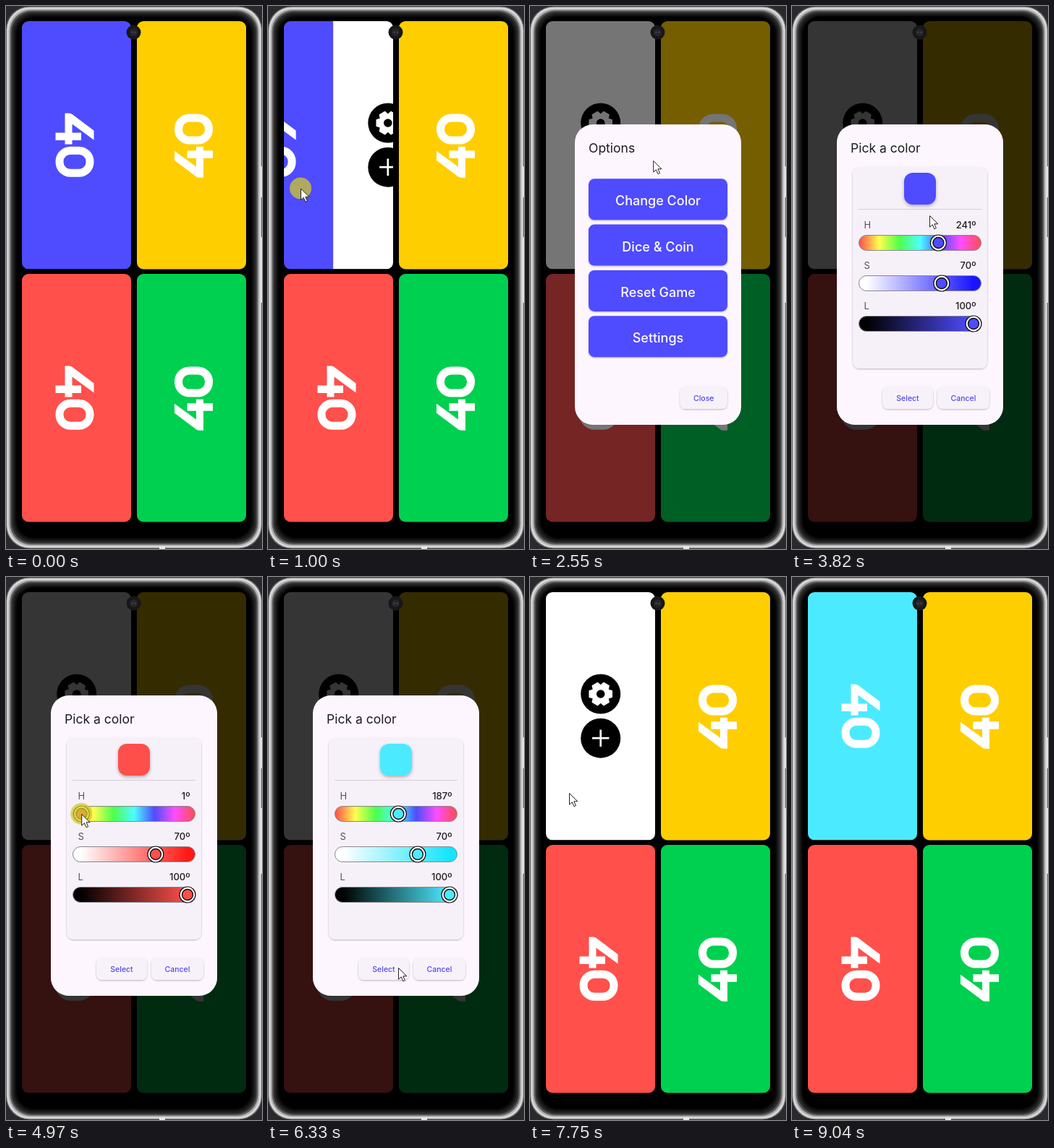
Animation, 354 px wide and 752 px high, one loop 9.9 s. Source, as an HTML page:

```html
<!DOCTYPE html>
<html lang="en">
<head>
<meta charset="utf-8">
<title>Score counter</title>
<style>
  html, body { margin: 0; width: 100%; height: 100%; overflow: hidden; background: #29292e; }
  svg { display: block; width: 354px; height: 752px; }
  text { font-family: Inter, Roboto, sans-serif; }
  .title { font-size: 17.5px; fill: #1d1b20; }
  .big { font-size: 18px; font-weight: 500; fill: #fff; text-anchor: middle; }
  .small { font-size: 10.5px; font-weight: 500; fill: #5048f0; text-anchor: middle; }
  .label { font-size: 13px; fill: #55525a; }
  .value { font-size: 13px; font-weight: 500; fill: #1d1b20; text-anchor: end; }
</style>
</head>
<body>
<svg id="stage" viewBox="0 0 354 752" xmlns="http://www.w3.org/2000/svg"></svg>
<script>
const LOOP = 9900;
const CELL = { w: 151, h: 343.4, r: 9 };
const stage = document.getElementById('stage');

const rect = (x, y, w, h, r, fill, more = '') =>
  `<rect x="${x}" y="${y}" width="${w}" height="${h}" rx="${r}" fill="${fill}" ${more}/>`;
const text = (cls, x, y, str, more = '') =>
  `<text class="${cls}" x="${x}" y="${y}" ${more}>${str}</text>`;
const group = (x, y, turn, inner) =>
  `<g transform="translate(${x} ${y}) rotate(${turn})">${inner}</g>`;
const each = (n, f) => Array.from({ length: n }, (_, i) => f(i)).join('');
const vivid = (h, s = 70) => `hsl(${h} 100% ${100 - s / 2}%)`;

// ---------- phone ----------
const ring = (d, grey) =>
  rect(d, d + 0.5, 354 - 2 * d, 751 - 2 * d, 32 - d / 2, `rgb(${grey},${grey},${grey})`);

function phone() {
  const metal = ring(0, 110) + ring(1.2, 218) + ring(3.5, 176) + ring(5.5, 92);
  const bezel = each(9, i => ring(7.5 + i, 52 * (1 - i / 8) ** 1.3));
  const keys = rect(352, 222, 2, 43, 0, '#e4e4e4') + rect(352, 320, 2, 91, 0, '#e4e4e4');
  return metal + bezel + keys + rect(212, 748, 8, 4, 0, '#e8e8e8');
}

function camera() {
  const lens = [-1, 1].map(s => `<circle cx="${2 * s}" r="1.2" fill="#45454f"/>`).join('');
  return group(176.5, 36.5, 0, `<circle r="10" fill="#17171a"/><circle r="5.5" fill="#242429"/>${lens}`);
}

// ---------- score panels ----------
const forty = (x, y, turn) => group(x, y, turn, `
  <rect x="7.7" y="-21" width="31" height="42" rx="15" fill="none" stroke="#fff" stroke-width="11"/>
  <path fill="#fff" d="M-20 -26.5L-43 4Q-44 6 -44 8V13.5H-1V3.5H-29L-7 -26.5Z"/>
  <path fill="#fff" d="M-17 -9H-6.5V26.5H-17Z"/>`);

const gear = (x, y) => group(x, y, 0, `<circle r="27.5"/><g fill="#fff">
  ${each(6, i => `<path d="M8 -6.5L15.5 -4.2V4.2L8 6.5Z" stroke="#fff" stroke-width="1.6"
    stroke-linejoin="round" transform="rotate(${i * 60})"/>`)}<circle r="12.2"/></g><circle r="5.8"/>`);

const plus = (x, y) => group(x, y, 0,
  '<circle r="27.5"/><path d="M-11.7 0H11.7M0 -11.7V11.7" stroke="#fff" stroke-width="2.7"/>');

function panels() {
  const cells = ['#504bff', '#ffce00', '#ff504c', '#00d050'].map((color, i) => {
    const col = i % 2, row = i >> 1;
    const x = 22 + col * 159, y = 21 + row * 350;
    const number = forty(95 + col * 164.5, 192.5 + row * 350 + col * 1.2, col ? -90 : 90);
    const card = r => rect(x, y, CELL.w, CELL.h, r, color, i ? '' : 'id="card"');
    return i ? card(CELL.r) + number : `<g clip-path="url(#cell)">
      <g id="score">${card(0)}${number}</g>
      <g id="menu">${rect(x, y, CELL.w + 1, CELL.h, 0, '#fff')}${gear(97.7, 162)}${plus(97.7, 223.2)}</g></g>`;
  });
  return `<clipPath id="cell">${rect(22, 21, CELL.w, CELL.h, CELL.r, '#000')}</clipPath>` + cells.join('');
}

// ---------- dialogs ----------
const dialog = (id, title, inner) => `<g id="${id}">
  ${rect(16, 14, 322, 714, 24, '#000', 'opacity=".54"')}
  ${rect(62, 164, 230, 416, 25, '#fdf6ff')}
  ${text('title', 81, 203, title)}${inner}</g>`;

const flat = (x, w, str) => rect(x, 527, w, 31, 8, '#f7f2fa', 'filter="url(#lift)"') +
  text('small', x + w / 2, 547, str);

function options() {
  const rows = ['Change Color', 'Dice &amp; Coin', 'Reset Game', 'Settings'].map((s, i) => {
    const y = 239.3 + i * 63.3;
    return rect(81, y, 192, 57, 8, '#504bff', 'filter="url(#lift)"') + text('big', 177, y + 37, s);
  });
  return dialog('options', 'Options', rows.join('') + flat(207.5, 65.5, 'Close'));
}

const slider = (name, i) => {
  const y = 328 + i * 56;
  return text('label', 99.5, y - 20, name) + text('value', 254.5, y - 20, '', `id="v${name}"`) +
    rect(92.5, y - 10.5, 169, 21, 10.5, `url(#g${name})`, 'stroke="#8a878f"') +
    `<g id="t${name}"><circle cy="${y}" r="11" fill="#fff" stroke="#111" stroke-width="1.2"/>
     <circle class="dot" cy="${y}" r="7.5" stroke="#111" stroke-width="1.4"/></g>`;
};

function picker() {
  const rainbow = each(13, i => `<stop offset="${i / 12}" stop-color="${vivid(i * 30)}"/>`);
  const fade = (name, from) => `<linearGradient id="g${name}">
    <stop stop-color="${from}" offset=".06"/><stop id="e${name}" offset=".94"/></linearGradient>`;
  return `<linearGradient id="gH">${rainbow}</linearGradient>${fade('S', '#fff')}${fade('L', '#000')}` +
    dialog('picker', 'Pick a color',
      rect(84, 222.5, 186, 279.5, 9, '#f6f1f8', 'filter="url(#lift)"') +
      rect(155, 231, 44, 44, 12, '#fff', 'id="swatch" filter="url(#drop)"') +
      rect(92, 281, 170, 1, 0, '#d3ced6') + ['H', 'S', 'L'].map(slider).join('') +
      flat(125, 70, 'Select') + flat(201, 72, 'Cancel'));
}

const shadow = (id, dy, blur, a) => `<filter id="${id}" x="-20%" y="-20%" width="140%" height="150%">
  <feDropShadow dx="0" dy="${dy}" stdDeviation="${blur}" flood-opacity="${a}"/></filter>`;

stage.innerHTML = `<defs>${shadow('lift', 1, 0.8, 0.28)}${shadow('drop', 2, 2, 0.3)}</defs>
  ${phone()}${panels()}${options()}${picker()}${camera()}
  <g id="cursor"><circle id="press" r="15" fill="#d2ca28" opacity=".74"/>
  <path d="M.5 .5V16.2L4.2 12.8L6.9 18.8L9.4 17.7L6.8 11.8H11.8Z" fill="#fff" stroke="#222"/></g>`;

const el = {};
stage.querySelectorAll('[id]').forEach(n => el[n.id] = n);
const dots = stage.querySelectorAll('.dot');

// ---------- motion ----------
const ramp = (t, from, to) => Math.min(1, Math.max(0, (t - from) / (to - from)));
const ease = k => k * k * (3 - 2 * k);
const within = (t, from, to) => t >= from && t < to;

const OPEN = 780, BACK = 8040, DRAG = 280;
const HUE_FROM = 4440, HUE_TO = 5180;
const TAPS = [1800, 3150, 5920, 7070];

// the finger pulls the page part of the way, then it settles
const swipe = t => 0.62 * ease(ramp(t, 0, DRAG)) +
  0.38 * (1 - (1 - ramp(t, DRAG, DRAG + 410)) ** 2);

// one sweep over the whole hue bar and back to cyan
const hue = t => 180 + 180 * Math.cos(-1.225 + 5.976 * ramp(t, HUE_FROM, HUE_TO));
const knob = v => 104 + v * 147;

const fade = (t, show, hide) => ramp(t, show, show + 200) * (1 - ramp(t, hide, hide + 150));

// pointer legs: start, end, x, y
const ENTRY = [318, 698];
const LEGS = [
  [120, 650, 130, 256], [OPEN, OPEN + DRAG, 34, 252],
  [1680, 1800, 88, 152], [2150, 2600, 173, 216], [2690, 2890, 175, 283],
  [3480, 3820, 190, 290], [3820, 4230, 202, 328],
  [HUE_FROM, HUE_TO, 180, 328], [5230, 5380, 203, 499],
  [5450, 5780, 169, 545], [6140, 6330, 180, 541], [6670, 6930, 230, 535],
  [7230, 7750, 54, 299], [7890, 8010, 34, 275], [BACK, BACK + DRAG, 130, 270],
  [8380, 8830, 257, 524], [8900, 8970, 283, 669]
];

function pointer(t) {
  if (within(t, HUE_FROM, HUE_TO)) return [knob(hue(t) / 360), 328];
  return LEGS.reduce(([px, py], [from, to, x, y]) => {
    const k = ease(ramp(t, from, to));
    return [px + (x - px) * k, py + (y - py) * k];
  }, ENTRY);
}

const pressed = t => TAPS.some(a => within(t, a, a + 130)) ||
  [OPEN, BACK].some(a => within(t, a, a + DRAG + 40)) || within(t, HUE_FROM, HUE_TO);

const move = (n, x, y = 0) => n.setAttribute('transform', `translate(${x} ${y})`);
const fill = (n, c) => n.setAttribute('fill', c);
const show = (n, a) => {
  n.setAttribute('opacity', a);
  n.style.display = a > 0 ? '' : 'none';
};

function draw(t) {
  const p = swipe(t - OPEN) - swipe(t - BACK);
  move(el.score, -CELL.w * p);
  move(el.menu, CELL.w * (1 - p));

  const h = Math.round(hue(t)), color = vivid(h);
  fill(el.card, vivid(t < 6400 ? 241 : h));
  show(el.options, fade(t, 2000, 7200));
  show(el.picker, t < 6400 ? fade(t, 3480, LOOP) : 0);

  fill(el.swatch, color);
  dots.forEach(d => fill(d, color));
  el.eS.setAttribute('stop-color', vivid(h, 92));
  el.eL.setAttribute('stop-color', color);
  [['H', h, 360], ['S', 70, 100], ['L', 100, 100]].forEach(([name, v, max]) => {
    el['v' + name].textContent = v + 'º';
    move(el['t' + name], knob(v / max));
  });

  move(el.cursor, ...pointer(t));
  show(el.cursor, within(t, 120, 9040) ? 1 : 0);
  el.press.style.display = pressed(t) ? '' : 'none';
}

const start = performance.now();
function tick() {
  draw((performance.now() - start) % LOOP);
  requestAnimationFrame(tick);
}
tick();
</script>
</body>
</html>
```
